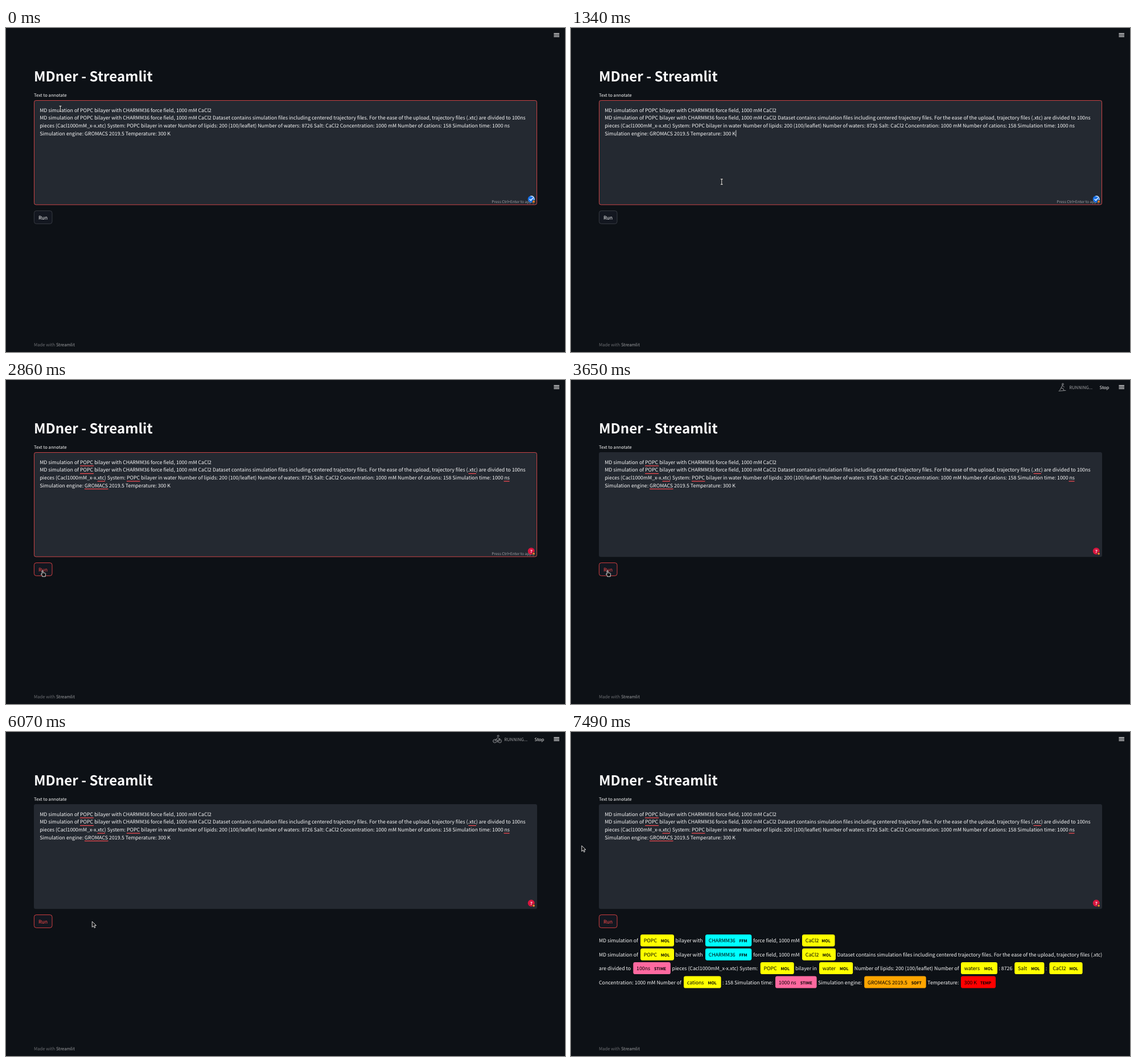
Write an HTML page that moves like this. It is 982 by 570 pixels and loops after 8 s.

```html
<!DOCTYPE html>
<html lang="en">
<head>
<meta charset="utf-8">
<title>MDner - Streamlit</title>
<style>
html, body { margin: 0; width: 100%; height: 100%; overflow: hidden; background: #0d1116; }
svg { display: block; width: 982px; height: 570px; }
text {
  font-family: "Noto Sans CJK JP", "Noto Sans CJK SC", "Noto Sans CJK KR", "Noto Sans CJK TC", "Noto Sans CJK", "Open Sans", sans-serif;
  text-rendering: geometricPrecision;
  white-space: pre;
}
.line { fill: none; stroke-linecap: round; stroke-linejoin: round; }
</style>
</head>
<body>
<svg id="stage" viewBox="0 0 982 570" xmlns="http://www.w3.org/2000/svg">
  <rect width="982" height="570" fill="#0d1116"/>
  <path d="M962.4 9.7h9.6M962.4 12.45h9.6M962.4 15.2h9.6" stroke="#fafafa" stroke-width="1.2"/>
  <g id="labels"></g>

  <rect x="49" y="127" width="884" height="184.3" rx="3.2" fill="#242931"/>
  <rect id="focus" x="49.5" y="127.5" width="883" height="183.4" rx="3.2" fill="none" stroke="#ff4b4b" stroke-width=".75"/>
  <g id="field"></g>
  <g id="marks" stroke="#ee4a50" stroke-width="1.3"></g>
  <path id="caret" d="M289.8 179.6v11.6" stroke="#fafafa" stroke-width=".8"/>
  <g id="hint"></g>

  <g id="checking">
    <circle cx="922.7" cy="301" r="6" fill="#1a73e8"/>
    <path id="spin" class="line" d="M921.8 295.8a5.3 5.3 0 0 1 4.3 9.2" stroke="#dbe9fd" stroke-width="1.2"/>
    <path class="line" d="M920 301.2l2 2 3.6-4" stroke="#fff" stroke-width="1.3"/>
  </g>
  <g id="count">
    <circle cx="922.7" cy="301" r="6" fill="#d9163f"/>
  </g>
  <circle cx="927" cy="305.5" r="2.7" fill="#242931"/>
  <circle cx="927" cy="305.5" r="1.9" fill="#e8802a"/>

  <rect id="button" x="49.4" y="321.6" width="31.6" height="22.8" rx="3.8" fill="#131720" stroke-width=".8"/>
  <g id="run"></g>
  <g id="status">
    <path id="sport" class="line" transform="translate(855 5)" stroke="#a0a1a4" stroke-width=".9"/>
  </g>
  <g id="result"></g>

  <g id="beam" class="line">
    <path d="M-1.6 -4.6h3.2M0 -4.6v9.2M-1.6 4.6h3.2" stroke="#111" stroke-width="2.4"/>
    <path d="M-1.6 -4.6h3.2M0 -4.6v9.2M-1.6 4.6h3.2" stroke="#e4e4e4" stroke-width="1.1"/>
  </g>
  <path id="arrow" d="M0 0V10L2.4 7.8L4 11.3L5.6 10.6L4.1 7.1H7.2Z" fill="#111" stroke="#f0f0f0" stroke-width=".9" stroke-linejoin="round"/>
  <path id="hand" d="M-1.4 .8Q-.6 -.6 .3 .8V4.2L4 5Q5.2 5.3 5 6.6L4.5 9V11H-1V9.6L-3.2 6.8Q-3.2 5.5 -1.4 6.6Z" fill="#111" stroke="#f0f0f0" stroke-width=".9" stroke-linejoin="round"/>
</svg>
<script>
const NS = 'http://www.w3.org/2000/svg';
const LOOP = 8000;
const BASE = 8.777, SMALL = 7.68, TINY = 6.58;
const WHITE = '#fafafa', RED = '#ff4b4b';
const $ = id => document.getElementById(id);

function add(parent, tag, attrs, content) {
  const el = document.createElementNS(NS, tag);
  for (const k in attrs) el.setAttribute(k, attrs[k]);
  if (content) el.textContent = content;
  $(parent).appendChild(el);
  return el;
}
function label(parent, x, y, content, size = BASE, fill = WHITE, more = {}) {
  return add(parent, 'text', { x, y, 'font-size': size, fill, ...more }, content);
}

const bold = { 'font-weight': 700 };
label('labels', 48.9, 93.7, 'MDner - Streamlit', 24.14, WHITE, bold);
label('labels', 49, 120.6, 'Text to annotate', SMALL);
label('labels', 49, 560.4, 'Made with', SMALL, '#6c6e72');
label('labels', 87.9, 560.4, 'Streamlit', SMALL, '#9c9da0');
label('hint', 853.3, 308.1, 'Press Ctrl+Enter to apply', TINY, '#a3a4a8');
label('count', 922.7, 303.7, '7', 7, '#fff', { ...bold, 'text-anchor': 'middle' });
const runText = label('run', 65, 336.6, 'Run', BASE, WHITE, { 'text-anchor': 'middle' });
label('status', 875.2, 15.5, 'RUNNING...', SMALL, '#a0a1a4');
label('status', 928.6, 15.5, 'Stop', SMALL);

const head = 'MD simulation of POPC bilayer with CHARMM36 force field, 1000 mM CaCl2';
const tail = 'Dataset contains simulation files including centered trajectory files. For the ease of the upload, trajectory files (.xtc)';
[
  head,
  head + ' ' + tail + ' are divided to 100ns',
  'pieces (Cacl1000mM_x-x.xtc) System: POPC bilayer in water Number of lipids: 200 (100/leaflet) Number of waters: 8726 Salt: CaCl2 Concentration: 1000 mM Number of cations: 158 Simulation time: 1000 ns',
  'Simulation engine: GROMACS 2019.5 Temperature: 300 K'
].forEach((s, i) => label('field', 59.2, 147.9 + i * 13.55, s));

// spelling marks: row, left, right
[[0, 130, 154], [1, 130, 154], [1, 812.5, 826], [2, 160.5, 174], [2, 212, 235.5], [2, 874.5, 884.5], [3, 138, 179.5]]
  .forEach(([row, a, b]) => add('marks', 'path', { d: `M${a} ${151 + row * 13.55}H${b}` }));

const COLOURS = { MOL: '#ffff00', FFM: '#00ffff', STIME: '#ff69a0', SOFT: '#ffa500', TEMP: '#ff0000' };
const opening = [
  [49, 'MD simulation of'], [122, 'POPC', 'MOL', 59], [183.6, 'bilayer with'],
  [236, 'CHARMM36', 'FFM', 81.3], [320, 'force field, 1000 mM']
];
// plain text: x, words; tag: x, words, kind, width
[
  [...opening, [406, 'CaCl2', 'MOL', 57.5]],
  [...opening, [406, 'CaCl2', 'MOL', 59], [467.6, tail]],
  [[49, 'are divided to'], [109.3, '100ns', 'STIME', 65.6], [177.5, 'pieces (Cacl1000mM_x-x.xtc) System:'],
   [332.7, 'POPC', 'MOL', 59], [394, 'bilayer in'], [436, 'water', 'MOL', 59.2],
   [497.8, 'Number of lipids: 200 (100/leaflet) Number of'], [685, 'waters', 'MOL', 64], [751.4, ': 8726'],
   [779.2, 'Salt', 'MOL', 52.2], [833.8, ':'], [840.4, 'CaCl2', 'MOL', 58.2]],
  [[49, 'Concentration: 1000 mM Number of'], [198, 'cations', 'MOL', 65.6], [266, ': 158 Simulation time:'],
   [359, '1000 ns', 'STIME', 72.6], [434.1, 'Simulation engine:'], [515.2, 'GROMACS 2019.5', 'SOFT', 108.5],
   [626.3, 'Temperature:'], [685, '300 K', 'TEMP', 61]]
].forEach((row, i) => {
  const y = 370.3 + i * 24.45;
  for (const [x, words, kind, width] of row) {
    if (!kind) { label('result', x, y, words); continue; }
    add('result', 'rect', { x, y: y - 14.1, width, height: 21, rx: 3.4, fill: COLOURS[kind] });
    label('result', x + 5.8, y, words, BASE, '#000');
    label('result', x + width - 7.7, y, kind, 7.02, '#000', { ...bold, 'text-anchor': 'end' });
  }
});

const disc = (x, y, r) => `M${x - r} ${y}a${r} ${r} 0 1 0 ${2 * r} 0a${r} ${r} 0 1 0 ${-2 * r} 0`;
const sports = [
  disc(3.6, 11, 3) + disc(12.4, 11, 3) + disc(9.6, 2, 1.4) + 'M12.4 11L11 6.8H13M8 13L9 10L6.2 7.4L9.2 4.8L11 6.6M3.6 11L6.2 7.4',
  disc(10, 2, 1.4) + 'M8.8 4.6L7 8.8L10 10.6L9.4 14M7 8.8L5.6 11.6H2.4M8.8 4.6L5.2 5.4L4 7.6M8.8 4.6L11 7H13',
  disc(11.5, 6, 1.5) + 'M2 10.4L8.6 8L5.6 5L8.8 3.8M1.6 13q1.6-1.4 3.2 0t3.2 0t3.2 0t3.2 0',
  disc(8, 3.6, 1.4) + 'M2.5 1.6H13.5M2.5 .4V2.8M13.5 .4V2.8M4 1.6L5.6 6H10.4L12 1.6M8 6V10L5.4 14M8 10L10.6 14',
  disc(7, 2, 1.4) + 'M7 4.4L6.4 9L9 11L8.4 14.4M6.4 9L4 14M7 4.4L10 7L13 5M7 4.4L3.4 7',
  disc(9, 2.4, 1.4) + 'M8 4.8L6 9L9.6 10L11 13.4M6 9L3.6 13M8 4.8L11.4 7.4M2 14.4L14 13.4'
];

// pointer stops: time, x, y
const path = [
  [0, 95.5, 142], [80, 95.5, 142], [1340, 264.7, 270.5], [1480, 268, 272], [2640, 64.7, 334.8],
  [4360, 64.7, 334.8], [4850, 109.2, 332.5], [5560, 151.3, 333.3], [6230, 151.3, 333.3],
  [7020, 39, 221], [7150, 18.8, 200], [LOOP, 18.8, 200]
];
function pointer(t) {
  const i = path.findIndex(p => p[0] > t), a = path[i - 1], b = path[i];
  let u = (t - a[0]) / (b[0] - a[0]);
  if (a[0] === 1480) u = u * u * (3 - 2 * u);
  return [a[1] + (b[1] - a[1]) * u, a[2] + (b[2] - a[2]) * u];
}

const show = (id, on) => $(id).setAttribute('visibility', on ? 'visible' : 'hidden');
const inside = (x, y, l, t, r, b) => x > l && x < r && y > t && y < b;

function draw(t) {
  const [x, y] = pointer(t);
  const overRun = inside(x, y, 49, 321, 81, 345);
  const overField = inside(x, y, 49, 127, 933, 311);
  const kind = overRun ? 'hand' : overField ? 'beam' : 'arrow';
  for (const id of ['hand', 'beam', 'arrow']) {
    show(id, id === kind);
    $(id).setAttribute('transform', `translate(${x} ${y})`);
  }

  const red = overRun || t > 3170;
  runText.setAttribute('fill', red ? RED : WHITE);
  $('button').setAttribute('stroke', red ? RED : '#41444b');

  $('focus').setAttribute('opacity', Math.max(0, Math.min(1, (3370 - t) / 200)));
  show('hint', t < 3250);
  show('caret', t < 3170 && (t + 800) % 1000 < 500);

  const checked = t >= 2000;
  show('checking', !checked);
  show('count', checked);
  show('marks', checked);
  $('spin').setAttribute('transform', `rotate(${t % 670 / 670 * 360} 922.7 301)`);

  const done = t >= 7410;
  show('status', t >= 3330 && !done);
  show('result', done);
  const step = Math.floor((t % 1160 - 200 + 1160) % 1160 / (1160 / 6));
  $('sport').setAttribute('d', sports[step]);
}

function tick() {
  draw(performance.now() % LOOP);
  requestAnimationFrame(tick);
}
tick();
</script>
</body>
</html>
```
